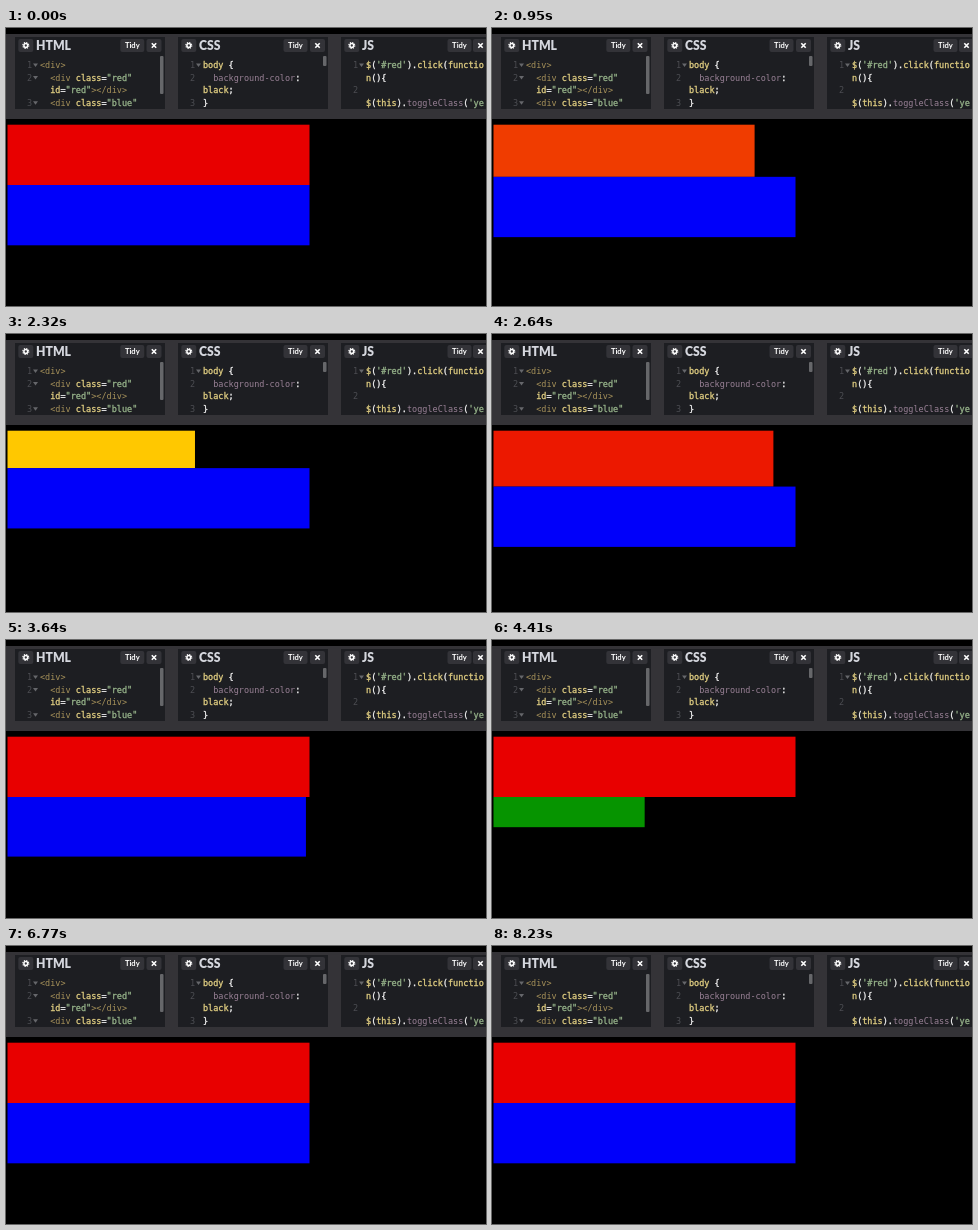
An HTML page that plays this animation: 480x278 px, repeating every 8.28 s.

```html
<!DOCTYPE html>
<html lang="en">
<head>
<meta charset="utf-8">
<title>Toggling boxes</title>
<style>
html, body { margin: 0; width: 100%; height: 100%; overflow: hidden; background: #000; }
svg { display: block; width: 480px; height: 278px; }
text { white-space: pre; }
.code { font: 8.5px "DejaVu Sans Mono", monospace; }
.key, .op, .str { stroke-width: .3px; }
.tag { fill: #a7925a; }
.key { fill: #e2cf82; stroke: #e2cf82; }
.str { fill: #96b38a; stroke: #96b38a; }
.op { fill: #f8f8f8; stroke: #f8f8f8; }
.prop { fill: #9a8297; }
.title { font: 900 12.2px Lato, sans-serif; fill: #d5d7de; }
.tidy { font: 700 7.6px Lato, sans-serif; fill: #fff; text-anchor: middle; }
</style>
</head>
<body>
<svg viewBox="0 0 480 278">
  <rect y="6" width="480" height="85" fill="#343337"/>
  <g id="panes"></g>
  <rect id="red" x="1.5"/>
  <rect id="blue" x="1.5"/>
</svg>
<script>
const LOOP = 8280, SPAN = 840, WIDTH = 302, HEIGHT = 60.3, TOP = 96.7;
const $ = id => document.getElementById(id);
const escape = s => s.replace(/&/g, '&amp;').replace(/</g, '&lt;');
const rect = (x, y, w, h, fill, r = 0) =>
  `<rect x="${x}" y="${y}" width="${w}" height="${h}" rx="${r}" fill="${fill}"/>`;
const button = (center, w) => rect(center - w / 2, 11, w, 13, '#333338', 2);

// Each line: [line number, foldable, kind, text, kind, text, ...]
const panes = [
  { title: 'HTML', x: 9, w: 150, close: 148, tidy: 126.3, code: 34, bar: [154, 38], lines: [
    [1, 1, 'tag', '<div>'],
    [2, 1, 'tag', '  <div ', 'key', 'class', 'op', '=', 'str', '"red"'],
    ['', 0, 'key', '  id', 'op', '=', 'str', '"red"', 'tag', '></div>'],
    [3, 1, 'tag', '  <div ', 'key', 'class', 'op', '=', 'str', '"blue"']
  ] },
  { title: 'CSS', x: 172, w: 150, close: 311.5, tidy: 289.5, code: 197, bar: [317, 10], lines: [
    [1, 1, 'key', 'body ', 'op', '{'],
    [2, 0, 'prop', '  background-color', 'op', ':'],
    ['', 0, 'key', 'black', 'op', ';'],
    [3, 0, 'op', '}']
  ] },
  { title: 'JS', x: 335, w: 145, close: 474.5, tidy: 453.5, code: 360, lines: [
    [1, 1, 'key', '$', 'op', '(', 'str', "'#red'", 'op', ').', 'key', 'click', 'op', '(', 'key', 'functio'],
    ['', 0, 'key', 'n', 'op', '(){'],
    [2, 0],
    ['', 0, 'key', '$', 'op', '(', 'key', 'this', 'op', ').', 'prop', 'toggleClass', 'op', '(', 'str', "'ye"]
  ] }
];

function codeLine(x, row, [number, fold, ...tokens]) {
  const y = 40 + row * 12.6;
  let spans = '';
  for (let i = 0; i < tokens.length; i += 2)
    spans += `<tspan class="${tokens[i]}">${escape(tokens[i + 1])}</tspan>`;
  return `<text class="code" x="${x - 13}" y="${y}" fill="#4c4d52">${number}</text>` +
    (fold ? `<path d="M${x - 7} ${y - 4.5}h5l-2.5 3.5z" fill="#66676b"/>` : '') +
    `<text class="code" x="${x}" y="${y}" xml:space="preserve">${spans}</text>`;
}

function pane({ title, x, w, close, tidy, code, bar, lines }) {
  const gear = x + 10.8;
  return rect(x, 9, w, 72, '#1d1e22') +
    button(gear, 15) +
    `<g fill="none" stroke="#fff"><circle cx="${gear}" cy="17.5" r="1.9" stroke-width="1.5"/>
     <circle cx="${gear}" cy="17.5" r="3" stroke-width="1.1" stroke-dasharray="1.18"/></g>` +
    `<text class="title" x="${x + 21}" y="22">${title}</text>` +
    button(tidy, 24) +
    `<text class="tidy" x="${tidy}" y="20">Tidy</text>` +
    button(close, 15) +
    `<path d="M${close - 2.2} 15.3l4.4 4.4m0-4.4l-4.4 4.4" stroke="#fff" stroke-width="1.6"/>` +
    lines.map((line, row) => codeLine(code, row, line)).join('') +
    (bar ? rect(bar[0], 28, 3.5, bar[1], '#66676a', 1) : '');
}
$('panes').innerHTML = panes.map(pane).join('');

// The CSS "ease" curve, solved by bisection.
function ease(p) {
  if (p <= 0) return 0;
  if (p >= 1) return 1;
  const bezier = (u, a, b) => 3 * u * (1 - u) * ((1 - u) * a + u * b) + u ** 3;
  let low = 0, high = 1;
  for (let i = 0; i < 24; i++) {
    const mid = (low + high) / 2;
    if (bezier(mid, .25, .25) < p) low = mid; else high = mid;
  }
  return bezier(low, .1, 1);
}

const toggled = (t, on, off) => ease((t - on) / SPAN) - ease((t - off) / SPAN);

// Channels may run past 0..255; rgb() clamps them.
const mix = (from, to, k) => `rgb(${from.map((c, i) => Math.round(c + (to[i] - c) * k))})`;

function drawBox(id, y, k, from, to) {
  const box = $(id), height = HEIGHT * (1 - k / 2);
  box.setAttribute('y', y);
  box.setAttribute('width', WIDTH * (1 - k / 2));
  box.setAttribute('height', height);
  box.setAttribute('fill', mix(from, to, k));
  return y + height;
}

function frame() {
  const t = performance.now() % LOOP;
  const bottom = drawBox('red', TOP, toggled(t, 792, 2173), [232, -18, 0], [262, 270, 0]);
  drawBox('blue', bottom, toggled(t, 3608, 4946), [0, -18, 250], [6, 148, -20]);
  requestAnimationFrame(frame);
}
frame();
</script>
</body>
</html>
```
